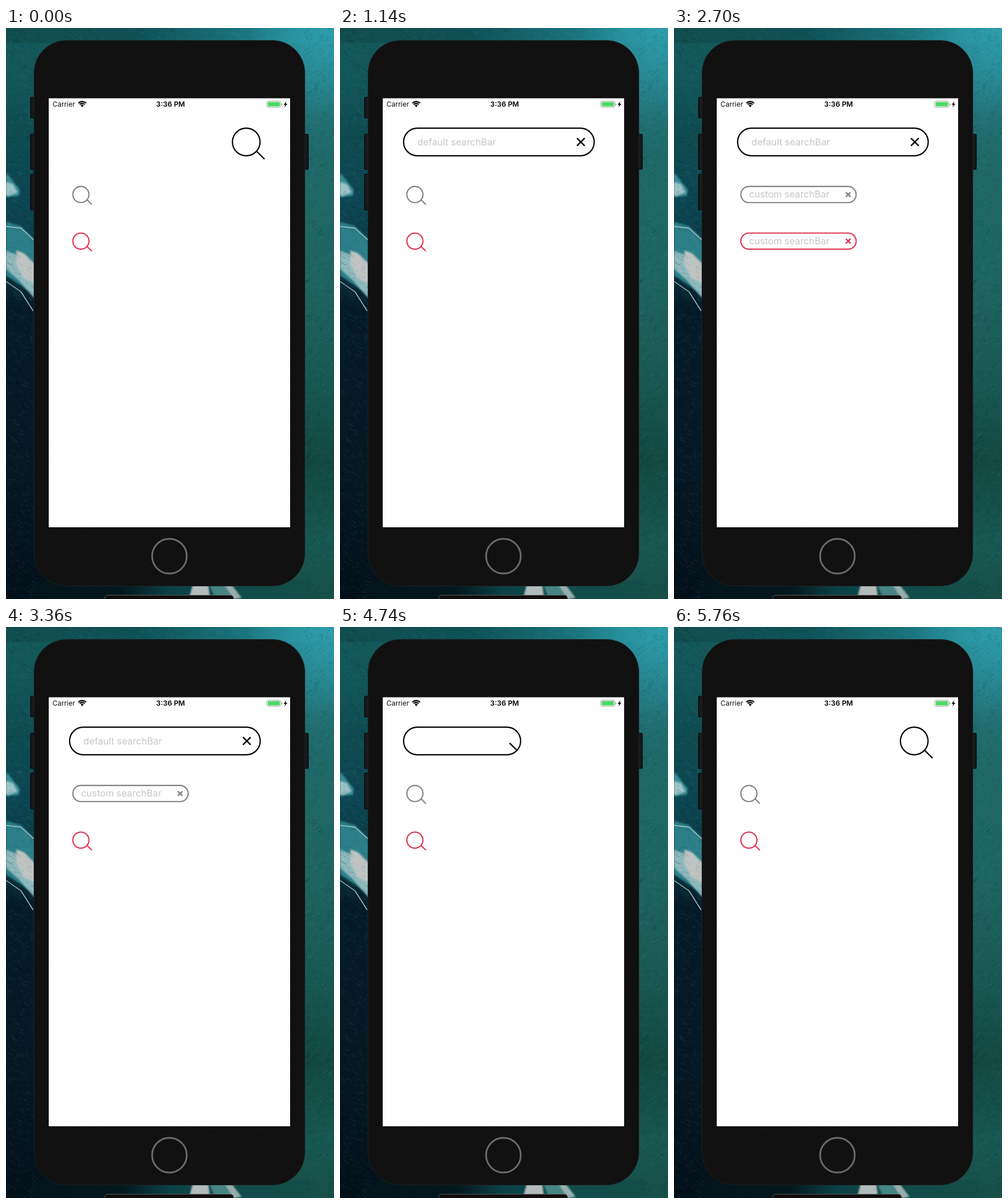
These frames come from a looping animation (568x987 px, 5820 ms). An HTML page with a canvas:

```html
<!DOCTYPE html>
<html lang="en">
<head>
<meta charset="utf-8">
<title>Search bars</title>
<style>
html, body { margin: 0; width: 100%; height: 100%; overflow: hidden; background: #0d0d0d; }
canvas { display: block; width: 568px; height: 987px; }
</style>
</head>
<body>
<canvas id="stage" width="568" height="987"></canvas>
<script>
const W = 568, H = 987, LOOP = 5820, STEP = 60, MORPH = 400, FADE = 300;
const FONT = 'Inter, "Open Sans", sans-serif';
const ctx = document.getElementById('stage').getContext('2d');

const makeCanvas = (w, h) => Object.assign(document.createElement('canvas'), { width: w, height: h });
const clamp = v => Math.max(0, Math.min(1, v));
const ease = v => { v = clamp(v); return v * v * (3 - 2 * v); };
const mix = (a, b, p) => a + (b - a) * p;

let seed = 41;
const rand = () => (seed = (seed * 16807) % 2147483647) / 2147483647;

function gradient(g, x0, y0, x1, y1, stops) {
  const fill = g.createLinearGradient(x0, y0, x1, y1);
  stops.forEach(([at, color]) => fill.addColorStop(at, color));
  return fill;
}

function rounded(g, x, y, w, h, r) {
  g.beginPath();
  g.roundRect(x, y, w, h, r);
}

function polygon(g, color, points) {
  g.fillStyle = color;
  g.beginPath();
  points.forEach(([x, y]) => g.lineTo(x, y));
  g.closePath();
  g.fill();
}

function line(g, x0, y0, x1, y1) {
  g.beginPath();
  g.moveTo(x0, y0);
  g.lineTo(x1, y1);
  g.stroke();
}

function label(g, text, x, y, size, color, weight = 400, align = 'left') {
  g.font = `${weight} ${size}px ${FONT}`;
  g.fillStyle = color;
  g.textAlign = align;
  g.fillText(text, x, y);
}

function drawSea(g) {
  g.fillStyle = gradient(g, 0, 0, 0, H, [[0, '#14595b'], [.1, '#12565a'], [.2, '#0e4a50'], [.3, '#0c4653'],
    [.42, '#0b3540'], [.49, '#051b29'], [.7, '#051a25'], [1, '#031019']]);
  g.fillRect(0, 0, 284, H);
  g.fillStyle = gradient(g, 0, 0, 0, H, [[0, '#22808b'], [.12, '#23757b'], [.22, '#1f6969'], [.42, '#1e6561'],
    [.62, '#195852'], [.76, '#124840'], [.9, '#185850'], [1, '#174f48']]);
  g.fillRect(284, 0, 284, H);
  g.fillStyle = gradient(g, 0, 0, W, 0, [[0, '#124e4f'], [.4, '#0e5155'], [.7, '#1a727b'], [1, '#2a97a5']]);
  g.fillRect(0, 0, W, 26);
  const glow = g.createRadialGradient(W, 10, 0, W, 10, 150);
  glow.addColorStop(0, '#2e9caa');
  glow.addColorStop(1, '#2e9caa00');
  g.fillStyle = glow;
  g.fillRect(400, 0, 168, 170);
  g.fillStyle = gradient(g, 0, 0, W, 0, [[0, '#03131b'], [.35, '#04171c'], [.5, '#0b4145'], [.68, '#0f4b48'], [1, '#174f48']]);
  g.fillRect(40, 955, W - 80, 32);

  // surf along the left edge and below the phone
  g.save();
  g.filter = 'blur(1.5px)';
  polygon(g, '#3b8f98', [[0, 250], [10, 262], [24, 280], [22, 290], [0, 292]]);
  polygon(g, '#9fc4c7', [[0, 266], [12, 270], [20, 284], [4, 291], [0, 288]]);
  polygon(g, '#2c7f89', [[0, 335], [26, 342], [50, 366], [50, 462], [24, 444], [0, 428]]);
  polygon(g, '#8fbabd', [[0, 385], [18, 392], [32, 420], [50, 440], [50, 468], [22, 436], [0, 416]]);
  polygon(g, '#bfc4c3', [[18, 384], [32, 390], [50, 408], [50, 442], [30, 432], [18, 408]]);
  polygon(g, '#b3bcbb', [[324, 960], [350, 960], [353, 982], [318, 982]]);
  polygon(g, '#468584', [[352, 962], [388, 962], [400, 987], [360, 982]]);
  polygon(g, '#98aead', [[378, 962], [392, 964], [408, 985], [394, 987]]);
  g.restore();
  g.strokeStyle = '#a9c6c8';
  g.lineWidth = 1.4;
  line(g, 0, 343, 26, 346);
  line(g, 26, 346, 48, 366);
  line(g, 0, 438, 26, 456);
  line(g, 26, 456, 47, 489);

  // fine ripples
  for (let i = 0; i < 2600; i++) {
    const right = i % 2, x = right ? 515 + rand() * 60 : rand() * 50, y = rand() * H;
    const len = 2 + rand() * 6, bright = rand() < .5;
    g.strokeStyle = bright ? 'rgba(95,170,175,.13)' : 'rgba(0,10,20,.14)';
    g.lineWidth = .7 + rand() * .6;
    line(g, x, y, x + len, y + len * (right ? -.8 : .6));
  }
  for (let i = 0; i < 260; i++) {
    const x = rand() * W, y = rand() * 21;
    g.strokeStyle = i % 2 ? 'rgba(95,185,195,.12)' : 'rgba(0,20,25,.13)';
    line(g, x, y, x + 6, y + 4);
  }
}

function drawPhone(g) {
  [[42, 119, 37], [42, 183, 62], [42, 252, 63], [515, 183, 62]].forEach(([x, y, h]) => {
    rounded(g, x + .5, y + .5, 8, h - 1, 2);
    g.fillStyle = '#17191a';
    g.fill();
    g.strokeStyle = '#050607';
    g.lineWidth = 1.2;
    g.stroke();
  });

  const tile = makeCanvas(4, 4), dot = tile.getContext('2d');
  dot.fillStyle = '#0c0c0c';
  dot.fillRect(0, 0, 4, 4);
  dot.fillStyle = '#151515';
  dot.fillRect(0, 0, 2, 2);
  dot.fillRect(2, 2, 2, 2);
  rounded(g, 48.5, 21.5, 469, 943, 56);
  g.fillStyle = g.createPattern(tile, 'repeat');
  g.fill();
  g.strokeStyle = '#1b2224';
  g.lineWidth = 1;
  g.stroke();

  g.fillStyle = '#fff';
  g.fillRect(74, 121.5, 418, 741.5);
  g.strokeStyle = '#686b6b';
  g.lineWidth = 3;
  g.beginPath();
  g.arc(283, 913, 30, 0, 7);
  g.stroke();

  rounded(g, 171, 980.5, 223, 30, 5);
  g.fillStyle = '#120d0d';
  g.fill();
  g.strokeStyle = '#555b5b';
  g.lineWidth = 1;
  g.stroke();
}

function drawStatus(g) {
  label(g, 'Carrier', 80.5, 136.3, 12, '#111');
  label(g, '3:36 PM', 285, 136.3, 12.3, '#000', 600, 'center');

  g.strokeStyle = g.fillStyle = '#000';
  g.lineWidth = 2.1;
  [9.2, 5.9].forEach(r => {
    g.beginPath();
    g.arc(132, 136.3, r, -Math.PI * .76, -Math.PI * .24);
    g.stroke();
  });
  g.beginPath();
  g.moveTo(132, 137);
  g.arc(132, 136.3, 3.5, -Math.PI * .76, -Math.PI * .24);
  g.fill();

  rounded(g, 451.5, 126.5, 24.5, 10.5, 2.6);
  g.strokeStyle = '#a3a3a3';
  g.lineWidth = 1;
  g.stroke();
  rounded(g, 453.3, 128, 21, 7.6, 1.2);
  g.fillStyle = '#4cd964';
  g.fill();
  rounded(g, 477, 130, 1.5, 4, [0, 1.5, 1.5, 0]);
  g.fillStyle = '#a3a3a3';
  g.fill();
  polygon(g, '#000', [[485.6, 126.5], [480.8, 132.7], [483.6, 132.7], [482.2, 137.3], [487.2, 130.9], [484.4, 130.9]]);
}

const bars = [
  { text: 'default searchBar', color: '#000', rest: 391, left: 109, right: 441.3, top: 172, size: 50,
    pad: 25, base: 202.7, cross: 24.3, arm: 6.7, tail: [-7, 16, 6.6, 29.6], stroke: 2.2, open: 100, close: 4553 },
  { text: 'custom searchBar', color: '#7e8383', rest: 114.7, left: 114.7, right: 316.5, top: 272.8, size: 30,
    pad: 15.3, base: 293.4, cross: 14.8, arm: 4, tail: [-4.6, 9, 4, 17.4], stroke: 2.1, open: 1330, close: 3668 },
  { text: 'custom searchBar', color: '#df3150', rest: 114.7, left: 114.7, right: 316.5, top: 353.4, size: 30,
    pad: 15.3, base: 374, cross: 14.8, arm: 4, tail: [-4.6, 9, 4, 17.4], stroke: 2.1, open: 1900, close: 2900 }
];

function drawBar(g, bar, t) {
  const closing = t >= bar.close;
  const idle = t <= bar.open || t >= bar.close + MORPH;
  const p = closing ? 1 - ease((t - bar.close) / MORPH) : ease((t - bar.open) / MORPH);
  const { size, arm, tail, cross, stroke } = bar;
  const left = idle ? bar.rest : bar.left;
  const width = mix(size, bar.right - bar.left, p);
  const right = left + width, mid = bar.top + size / 2;

  g.strokeStyle = bar.color;
  g.lineWidth = stroke;
  rounded(g, left + stroke / 2, bar.top + stroke / 2, width - stroke, size - stroke, (size - stroke) / 2);
  g.stroke();

  // the handle slides in to become one arm of the cross
  g.lineWidth = mix(stroke, 2.5, p);
  const x = right - cross;
  line(g,
    right + mix(tail[0], -cross - arm, p), mid + mix(tail[1], -arm, p),
    right + mix(tail[2], -cross + arm, p), mid + mix(tail[3], arm, p));
  const grow = closing ? 0 : clamp((p - .6) / .35);
  if (grow) line(g, x + arm, mid - arm, x + arm - 2 * arm * grow, mid - arm + 2 * arm * grow);

  const shown = closing ? 0 : clamp((t - bar.open - MORPH) / FADE);
  if (shown) {
    g.globalAlpha = shown;
    label(g, bar.text, left + bar.pad, bar.base, 16.3, '#c6c6c8');
    g.globalAlpha = 1;
  }
}

const backdrop = makeCanvas(W, H);
[drawSea, drawPhone, drawStatus].forEach(draw => draw(backdrop.getContext('2d')));

function render(now) {
  const t = Math.floor((now % LOOP) / STEP) * STEP;
  ctx.drawImage(backdrop, 0, 0);
  bars.forEach(bar => drawBar(ctx, bar, t));
}

const start = performance.now();
function tick() {
  render(performance.now() - start);
  requestAnimationFrame(tick);
}
tick();
</script>
</body>
</html>
```
